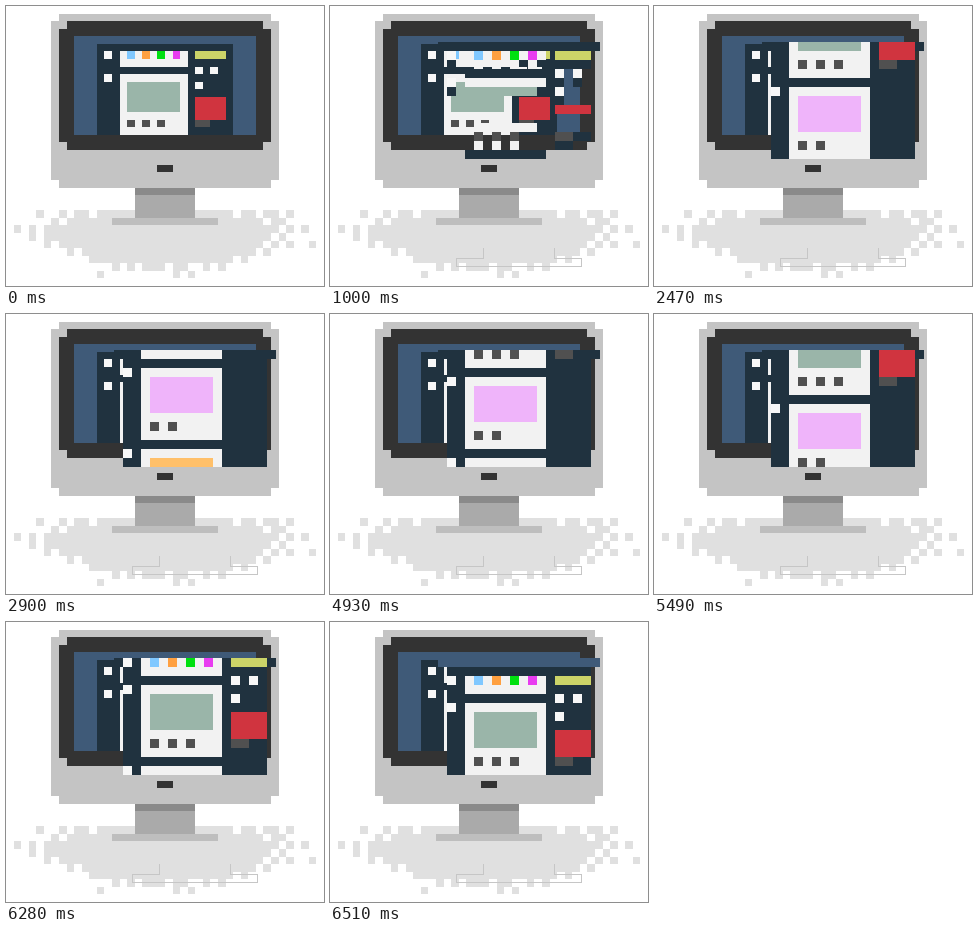
An HTML page with a canvas that plays this animation: 318x280 px, repeating every 9.98 s.

```html
<!DOCTYPE html>
<html lang="en">
<head>
<meta charset="utf-8">
<title>Pixel computer</title>
<style>
  html, body { margin: 0; width: 100%; height: 100%; overflow: hidden; background: #fff; }
  canvas { display: block; width: 318px; height: 280px; image-rendering: pixelated; }
</style>
</head>
<body>
<canvas id="stage" width="318" height="280"></canvas>
<script>
const ctx = document.getElementById('stage').getContext('2d');

const LOOP = 9980;
const BLUE = '#3f5a78', NAVY = '#20323f', PAPER = '#f2f2f2', WHITE = '#f7f7f7';
const DARK = '#505050', BEZEL = '#333333', CASE = '#c4c4c4', SHADE = '#e0e0e0';

// Start time of each scroll step; the page goes down 12 rows and back up.
const TIMES = [
  0, 1000, 1270, 1500, 1670, 1870, 2040, 2210, 2340, 2470, 2600, 2730, 2900,
  4930, 5100, 5360, 5490, 5660, 5790, 5920, 6050, 6165, 6280, 6395, 6510
];
const BOTTOM = 12, REFRESH = 9;
const scrollAt = step => BOTTOM - Math.abs(BOTTOM - step);

// Web page on a cell grid: column, row, width, height, colour.
const page = [
  [2, 1, 9, 2, PAPER], [12, 1, 4, 1, '#ccd468'],
  [12, 3, 1, 1, WHITE], [14, 3, 1, 1, WHITE], [12, 5, 1, 1, WHITE],
  [12, 7, 4, 3, '#d0343f'], [12, 10, 2, 1, DARK], [0, 1, 1, 1, WHITE]
];
['#80c8ff', '#ffa040', '#00e010', '#e83cf0'].forEach((color, i) => page.push([3 + 2 * i, 1, 1, 1, color]));
['#9ab5a9', '#efb4fa', '#ffc06a'].forEach((color, i) => {
  const row = 4 + 9 * i;
  page.push([0, row, 1, 1, WHITE], [2, row, 9, 8, PAPER], [3, row + 1, 7, 4, color]);
  for (let n = 0; n < 3 - i; n++) page.push([3 + 2 * n, row + 6, 1, 1, DARK]);
});

function pageColor(col, row) {
  if (row < 0) return BLUE;
  let color = NAVY;
  for (const [x, y, w, h, fill] of page) {
    if (col >= x && col < x + w && row >= y && row < y + h) color = fill;
  }
  return color;
}

function rect(x, y, w, h, color) {
  ctx.fillStyle = color;
  ctx.fillRect(x, y, w, h);
}

// Block on the 42 x 37 grid of the computer.
function block(col, row, w, h, color) {
  const gx = i => Math.round(i * 318 / 42), gy = i => Math.round(i * 280 / 37);
  rect(gx(col), gy(row), gx(col + w) - gx(col), gy(row + h) - gy(row), color);
}

// Shadow runs per row, starting at row 27.
const shadow = [
  '4 7 9-10 12-16 25-29 31-32 34-35 37',
  '6 8-33 35-36',
  '1 3 5-35 37 39',
  '3 5-34 36',
  '5 7-33 35 37 40',
  '8 10-32 34',
  '11-29 31',
  '14 16 18-20 22-23 26 28',
  '12 22 24'
];

function drawComputer() {
  rect(0, 0, 318, 280, '#fff');
  shadow.forEach((runs, i) => runs.split(' ').forEach(run => {
    const [from, to = from] = run.split('-').map(Number);
    block(from, 27 + i, to - from + 1, 1, SHADE);
  }));
  block(14, 28, 14, 1, '#bebebe');
  block(17, 24, 8, 1, '#8a8a8a');
  block(17, 25, 8, 3, '#aaaaaa');
  block(7, 1, 28, 23, CASE);
  block(6, 2, 30, 21, CASE);
  block(8, 2, 26, 17, BEZEL);
  block(7, 3, 28, 15, BEZEL);
  block(20, 21, 2, 1, BEZEL);
  block(9, 4, 24, 13, BLUE);
  for (let row = 0; row < 12; row++) {
    for (let col = -1; col < 17; col++) block(13 + col, 5 + row, 1, 1, pageColor(col, row));
  }
}

function drawOutline() {
  const line = (x, y, w, h) => rect(x, y, w, h, '#c6c6c6');
  line(153, 242, 1, 10);
  line(126, 252, 28, 1);
  line(126, 252, 1, 9);
  line(126, 260, 126, 1);
  line(251, 252, 1, 9);
  line(224, 252, 28, 1);
  line(224, 242, 1, 10);
}

// Only cells that differ from the previous step are painted over.
function drawStep(step) {
  const now = scrollAt(step), before = scrollAt(step - 1);
  for (let row = -1; row < 12; row++) {
    for (let col = -1; col < 17; col++) {
      const color = pageColor(col, row + now);
      const inside = col >= 0 && col < 16;
      if (color !== pageColor(col, row + before) || (step === REFRESH && inside)) {
        rect(117 + 9 * col, 45 + 9 * row, 9, 9, color);
      }
    }
  }
}

let shown = -1;

function frame() {
  const time = performance.now() % LOOP;
  let step = TIMES.length - 1;
  while (time < TIMES[step]) step--;
  if (step !== shown) {
    shown = step;
    drawComputer();
    if (step > 0) drawOutline();
    for (let i = 1; i <= step; i++) drawStep(i);
  }
  requestAnimationFrame(frame);
}
frame();
</script>
</body>
</html>
```
